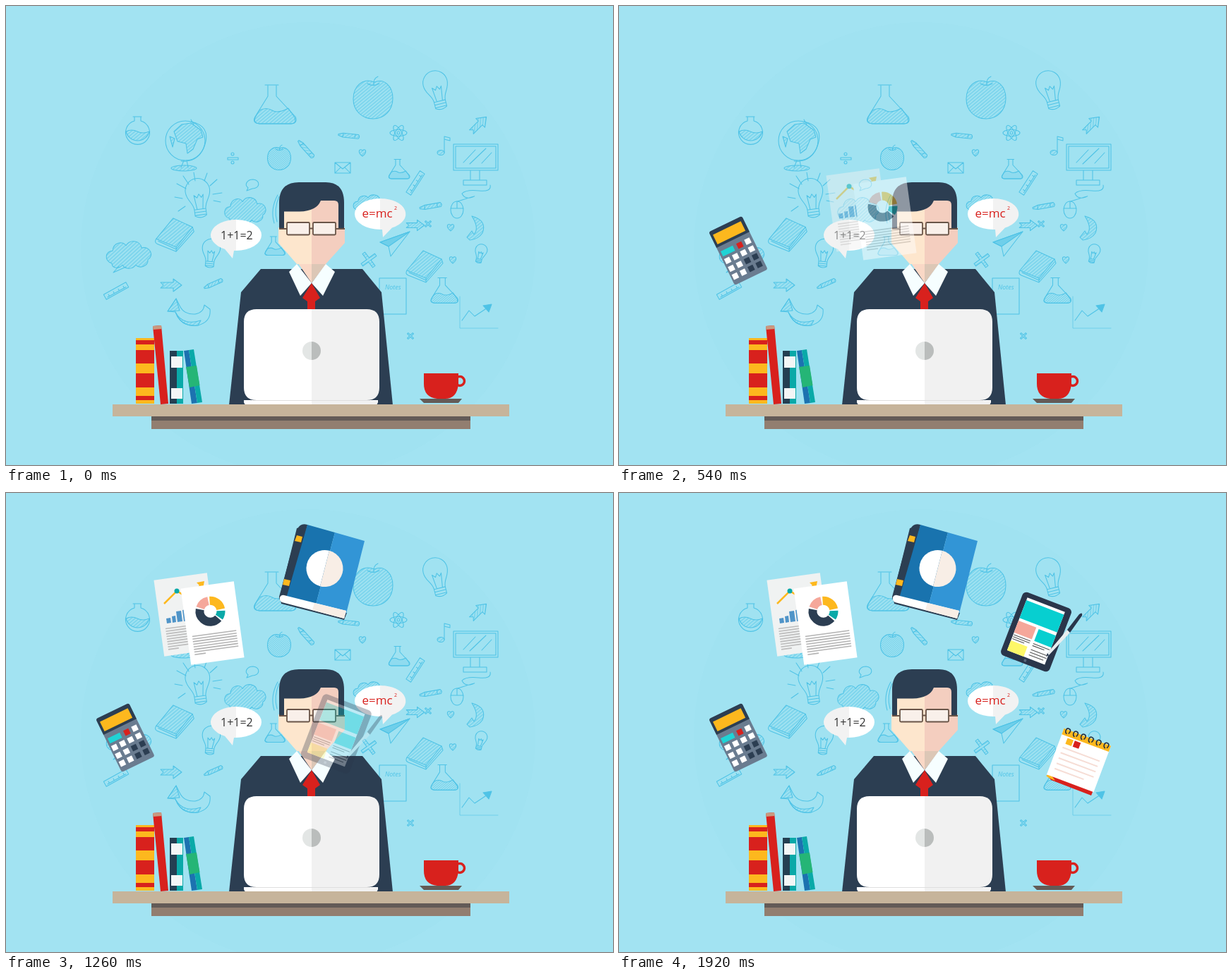
An HTML page for the animation above (2.42 s loop, 860 by 651 pixels).

```html
<!DOCTYPE html>
<html lang="en">
<head>
<meta charset="utf-8">
<title>Busy desk</title>
<style>
html, body { margin: 0; height: 100%; overflow: hidden; background: #a2e3f2; }
svg { display: block; width: 100vw; height: 100vh; }
path { vector-effect: non-scaling-stroke; }
text { font-family: "Open Sans", "Noto Sans", sans-serif; }
#doodles { fill: none; stroke: #4fc3e6; stroke-width: 1.05; stroke-linejoin: round; stroke-linecap: round; }
.hatch { fill: url(#hatch); }
.solid { fill: #4fc3e6; }
</style>
</head>
<body>
<svg viewBox="0 0 860 651">
<defs>
  <pattern id="hatch" width="3.6" height="3.6" patternUnits="userSpaceOnUse" patternTransform="rotate(-40)">
    <path d="M0 1.8H3.6" stroke="#5ac8e8" stroke-width=".9"/>
  </pattern>
  <g id="flask">
    <path d="M-14-27H5M-10-26V-11L-28 18Q-33 27-22 28H23Q33 27 29 18L2-11V-26"/>
    <path class="hatch" d="M-22 9Q-12 4-4 9T19 6L28 19Q31 28 23 28H-22Q-31 27-28 19Z"/>
  </g>
  <g id="bulb">
    <path d="M-8 14C-8 4-17 0-17-12A17 17 0 0 1 17-12C17 0 8 4 8 14ZM-8 14V23Q0 28 8 23V14M-8 18H8M-8 22H8M-4 14L-6-6L-2-2L1-7L4-2L7-6L4 14"/>
  </g>
  <path id="heart" class="hatch" d="M0 5C-8-1-4-7 0-3C4-7 8-1 0 5Z"/>
  <path id="cross" class="hatch" d="M-10-7L-7-10L0-3L7-10L10-7L3 0L10 7L7 10L0 3L-7 10L-10 7L-3 0Z"/>
  <path id="arrow" class="hatch" d="M-15-4H3V-9L15 0L3 9V4H-15L-11 0Z"/>
  <g id="book">
    <path class="hatch" d="M-25 7L-2-21L24-9L2 18Z"/>
    <path d="M-25 7Q-28 12-23 14L2 24L26-3L24-9M2 18V24M-22 10L2 21L24-5"/>
  </g>
  <g id="cloud">
    <path class="hatch" d="M-24 11C-36 8-33-6-23-5C-22-17-8-18-4-12C2-21 17-18 18-9C31-12 36 2 27 6C28 15 15 18 10 13C4 20-6 18-9 13C-15 19-24 17-24 11Z"/>
  </g>
  <g id="apple">
    <path class="hatch" d="M2-24C-15-31-28-18-28 0C-28 16-16 28 0 28C16 28 28 16 28-1C28-18 16-30 2-24Z"/>
    <path d="M-8-22Q0-17 9-22M1-20Q0-29 7-32"/>
  </g>
  <path id="pen" class="hatch" d="M-16-1L-9-3H14Q17 0 14 3H-9L-16 1ZM-9-3V3M9-3V3"/>
  <path id="ruler" d="M-18-4H18V4H-18ZM-15 2H15M-12-1V2M-4-1V2M4-1V2M12-1V2"/>
</defs>

<rect width="860" height="651" fill="#a2e3f2"/>
<circle cx="428" cy="345" r="322" fill="#a0e2f1"/>

<g id="doodles">
  <use href="#flask" transform="translate(381 139)"/>
  <use href="#flask" transform="translate(557 231) scale(.5)"/>
  <use href="#flask" transform="translate(621 403) scale(.65)"/>
  <use href="#flask" transform="translate(381 340) scale(.48)"/>
  <path d="M180 157H192M182 157V163A17 17 0 1 0 191 163V157"/>
  <path class="hatch" d="M170 178Q178 174 186 178T203 178A17 17 0 0 1 170 178Z"/>
  <circle cx="254" cy="191" r="28"/>
  <path class="hatch" d="M238 178L249 168L262 166L276 176L279 186L271 189L265 203L257 209L255 195L243 192ZM232 185L239 188L236 200Z"/>
  <path d="M262 164Q290 170 282 196T248 220M266 168L262 161M252 219L248 229M256 219L258 229"/>
  <ellipse class="hatch" cx="252" cy="230" rx="18" ry="4"/>
  <use href="#bulb" transform="translate(273 274) rotate(-8) scale(1.02)"/>
  <path d="M239 271L250 273M242 252L255 259M251 241L259 253M266 236L268 248M285 237L281 248M299 246L289 255M306 265L293 267M304 278L294 276M244 291L254 284"/>
  <use href="#bulb" transform="translate(611 121) rotate(-14) scale(1.02)"/>
  <use href="#bulb" transform="translate(290 352) rotate(6) scale(.75)"/>
  <use href="#bulb" transform="translate(672 352) rotate(14) scale(.5)"/>
  <path d="M314 215H329V218H314Z"/>
  <circle cx="321" cy="210" r="2"/><circle cx="321" cy="222" r="2"/>
  <path d="M343 258C337 253 342 246 350 246C361 247 360 259 349 259L341 262Z"/>
  <use href="#cloud" transform="translate(339 290) scale(.92 1.05)"/>
  <use href="#cloud" transform="translate(174 353) scale(1 1.1)"/>
  <path d="M160 369L152 378L170 370"/>
  <use href="#cloud" transform="translate(516 281) scale(.75 .75)"/>
  <path d="M385 268Q374 288 380 308M387 270Q379 288 384 306"/>
  <use href="#apple" transform="translate(520 132)"/>
  <use href="#apple" transform="translate(387 216) scale(.59)"/>
  <use href="#pen" transform="translate(425 203) rotate(48)"/>
  <use href="#pen" transform="translate(486 184) rotate(6) scale(.95)"/>
  <use href="#pen" transform="translate(602 284) rotate(-10)"/>
  <use href="#pen" transform="translate(294 394) rotate(-24) scale(.9)"/>
  <g transform="translate(556 180)">
    <ellipse rx="12" ry="4.5"/><ellipse rx="12" ry="4.5" transform="rotate(60)"/><ellipse rx="12" ry="4.5" transform="rotate(120)"/><circle r="2"/>
  </g>
  <use href="#heart" transform="translate(505 208)"/>
  <use href="#heart" transform="translate(630 314)"/>
  <use href="#heart" transform="translate(633 360)"/>
  <path d="M466 222H488V237H466ZM466 222L477 231L488 222M466 237L474 229M488 237L480 229"/>
  <path d="M621 208V185L629 187V191L621 189"/>
  <ellipse class="hatch" cx="616" cy="208" rx="5" ry="3.5"/>
  <path d="M634 196H697V233H634ZM637 199H694V230H637ZM658 233V247M671 233V247M648 247H681V254H648ZM648 222L665 204M657 224L680 202M674 223L688 208"/>
  <path d="M686 254Q688 264 670 262T646 266Q650 275 661 271T640 277"/>
  <ellipse cx="639" cy="289" rx="9" ry="12"/><path d="M630 287H648M639 277V287"/>
  <use href="#arrow" transform="translate(670 168) rotate(-45)"/>
  <use href="#arrow" transform="translate(580 311) scale(.85)"/>
  <use href="#arrow" transform="translate(234 396)"/>
  <use href="#ruler" transform="translate(580 251) rotate(-57)"/>
  <use href="#ruler" transform="translate(156 404) rotate(-29)"/>
  <use href="#cross" transform="translate(598 309) scale(.45)"/>
  <use href="#cross" transform="translate(514 360) rotate(8)"/>
  <use href="#cross" transform="translate(573 468) scale(.45)"/>
  <path class="hatch" d="M660 298Q682 304 675 322Q669 331 657 332L653 328L660 319L663 324Q671 315 660 298Z"/>
  <use href="#book" transform="translate(593 368)"/>
  <use href="#book" transform="translate(239 323) scale(1.05)"/>
  <path d="M529 386H567V437H529Z"/>
  <path d="M530 335L572 320L545 355L542 341Z"/><path class="solid" d="M530 335L572 320L542 341Z" fill-opacity=".6"/>
  <path d="M643 412V457H697" stroke-width=".6"/><path d="M646 446L656 432L664 440L682 428"/>
  <path class="solid" d="M676 425L688 423L684 434Z"/>
  <path d="M229 433L241 415L246 425Q252 438 268 437Q280 435 281 424L289 430Q291 448 272 453Q248 456 240 434Z"/>
  <path class="hatch" d="M229 433L241 415L246 432ZM240 434Q250 454 276 446L272 453Q248 456 240 434Z"/>
  <text x="537" y="402" font-size="9" font-style="italic" fill="#4fc3e6" stroke="none">Notes</text>
</g>

<g id="bubbles">
  <path d="M326 303A36 22 0 0 0 310 344.700L321 358L323 347H326Z" fill="#f2f2f2"/>
  <path d="M326 303A36 22 0 0 1 326 347Z" fill="#fff"/>
  <text x="304" y="330.500" font-size="16" fill="#333">1+1=2</text>
  <path d="M530 273A36 22 0 0 0 530 317Z" fill="#fff"/>
  <path d="M530 273A36 22 0 0 1 547 314.500L534 328L533 317H530Z" fill="#f2f2f2"/>
  <g fill="#d8211d"><text x="504.500" y="300" font-size="17">e=mc</text><text x="550" y="289" font-size="7">2</text></g>
</g>

<g id="person">
  <path d="M361 373H505L532 406L548 566H316L333 406Z" fill="#2c3e52"/>
  <path d="M412 362H433V393Z" fill="#fad8c6"/><path d="M433 362H453V367L433 393Z" fill="#dcc7b6"/>
  <path d="M386 314V336L412 366L433 366V270H394V314Z" fill="#fde6cd"/>
  <path d="M480 314V336L453 366H433V270H473V314Z" fill="#f4cebf"/>
  <path d="M387 315V279Q387 250 415 250H453Q479 250 479 279V315H471V282Q471 276 465 276H446Q440 291 416 291.500H394V315Z" fill="#2c3e52"/>
  <path d="M412 366L401 377L417 411L433 393ZM453 366L466 377L449 411L433 393Z" fill="#f6feff"/>
  <path d="M433 393L445 414L438 419V431H427V419L420 414Z" fill="#d8211d"/>
  <g fill="#f9f0ea" stroke="#695548" stroke-width="1.800">
    <rect x="398" y="307" width="32" height="17.500" rx="1.500"/><rect x="435" y="307" width="32" height="17.500" rx="1.500"/>
    <path d="M430 315.500H435M387 316H398M467 316H480"/>
  </g>
</g>

<g id="laptop">
  <path d="M433 430H355Q337 430 337 448V541Q337 559 355 559H433Z" fill="#fff"/>
  <path d="M433 430H511Q529 430 529 448V541Q529 559 511 559H433Z" fill="#f1f1f1"/>
  <path d="M337 559H527V562Q526 566 522 566H342Q338 566 337 562Z" fill="#fff"/>
  <path d="M433 560H526V562Q526 566 522 566H433Z" fill="#f1f1f1"/>
  <path d="M350 559.500H516" stroke="#dedede"/>
  <path d="M433 476A13 13 0 0 0 433 502Z" fill="#e3e6e5"/><path d="M433 476A13 13 0 0 1 433 502Z" fill="#babdbc"/>
</g>

<g id="desk">
  <path d="M151 565H713V582H151Z" fill="#c6b49b"/>
  <path d="M206 582H658V588H206Z" fill="#635b57"/><path d="M206 588H658V600H206Z" fill="#927e70"/>
  <path d="M184 471H210V564H184Z" fill="#fdb81e"/>
  <path d="M184 474H210V480H184ZM184 488H210V507H184ZM184 521H210V541H184ZM184 553H210V559H184Z" fill="#d8211d"/>
  <path d="M208 454L220 453L230 564L219 565Z" fill="#d8211d"/><path d="M208 454L220 453L220.500 458L208.500 459Z" fill="#c99a80"/>
  <path d="M232 489H242V564H232Z" fill="#243f52"/><path d="M242 489H251V564H242Z" fill="#0aa9a8"/>
  <path d="M234 497H250V513H234ZM234 542H250V557H234Z" fill="#f3f6f6"/>
  <path d="M252 489L259 488L271 563L263 564Z" fill="#1c72b0"/><path d="M259 488L266 487L278 562L271 563Z" fill="#0aa9a8"/>
  <path d="M255 512L270 510L274.500 538L260 541Z" fill="#25b576"/>
  <path d="M586 557H646L641 563H592Z" fill="#635b57"/>
  <circle cx="643" cy="532" r="6.500" fill="none" stroke="#d8211d" stroke-width="3.500"/>
  <path d="M592 521H641V536Q639 557 622 557H611Q592 555 592 536Z" fill="#d8211d"/>
</g>

<g id="calculator"><g id="keys" transform="translate(169 347) rotate(-26)">
  <rect x="-26" y="-42" width="52" height="84" rx="3" fill="#6a7c90"/>
  <path d="M-26-17V-39Q-26-42-23-42H23Q26-42 26-39V-17Z" fill="#2c3e52"/>
  <rect x="-22.500" y="-36" width="44" height="15" fill="#fdb81e"/>
  <rect x="-23" y="-10" width="19" height="8" fill="#1fd3d5"/>
</g></g>

<g id="reports">
  <g transform="translate(254.500 172.500) rotate(-7.800)">
    <rect x="-38" y="-54.500" width="76" height="109" fill="#f0f2f2"/>
    <g class="lines" data-x="-31" data-y="16" data-n="9" data-w="60" stroke="#bcbcbc"></g>
  </g>
  <path d="M224 157L242 139L260 150L277 129" fill="none" stroke="#fdb81e" stroke-width="2.500"/>
  <path d="M270 127L281 125L279 136Z" fill="#fdb81e"/><circle cx="242" cy="139" r="3.500" fill="#0aa9a8"/>
  <path d="M227 178L233 177L234 184L228 185ZM235 175L240 174L241 183L236 184ZM241 168L248 167L250 182L243 183ZM250 166L256 165L258 181L252 182Z" fill="#4f94c8"/>
  <g transform="translate(292.500 184.500) rotate(-7.800)">
    <rect x="-38" y="-54.500" width="76" height="109" fill="#fff"/>
    <g id="donut" transform="translate(-.7 -17)" fill="none" stroke-width="12"></g>
    <g class="lines" data-x="-31" data-y="15" data-n="8" data-w="63" stroke="#b3b3b3"></g>
  </g>
</g>

<g id="textbook">
  <path d="M427 45L412 50L388 147L390 157L479 180L483 170L400 146Z" fill="#2c3e52"/>
  <path d="M427 45Q417 42 413 51L387 147Q387 153 391 154L404 146Z" fill="#2c3e52"/>
  <path d="M427 45L466 56L438 162L397 149Z" fill="#1973ae"/><path d="M466 56L508 68L482 171L438 162Z" fill="#3295d6"/>
  <path d="M394 145L482 167L479 178L391 155Q387 153 388 148Q390 144 394 145Z" fill="#fff"/>
  <path d="M437 156L482 167L479 178L434 166Z" fill="#f8eee6"/>
  <path d="M412 60L420 62L418 70L409 68ZM394 122L403 124L401 132L392 130Z" fill="#fdb81e"/>
  <g transform="translate(451.500 107) rotate(14.500)"><path d="M0-26A26 26 0 0 0 0 26Z" fill="#fff"/><path d="M0-26A26 26 0 0 1 0 26Z" fill="#f8eee6"/></g>
</g>

<g id="tablet">
  <g transform="translate(591 197) rotate(21)">
    <rect x="-37" y="-48" width="74" height="96" rx="6" fill="#2a364b"/>
    <rect x="-29" y="-41" width="57" height="80" fill="#fff"/>
    <path d="M-29-37H28V-10H-29ZM2-5H28V13H2Z" fill="#07cfd0"/>
    <path d="M-29-6H-2V12H-29Z" fill="#f5a79a"/><path d="M-29 24H-4V39H-29Z" fill="#fdf768"/>
    <path d="M-28 15H-3M-28 18H-3M-28 21H-10M2 17H27M2 20H20M2 26H27M2 30H27M2 34H24" stroke="#555" stroke-width="1.100"/>
    <circle cy="43.500" r="2" fill="#59677b"/>
  </g>
  <path d="M635 194L639 198L609 230L605 232L607 227Z" fill="#e9eef0"/>
  <path d="M635 194L652 172Q657 168 656 174L639 198Z" fill="#2a364b"/><path d="M609 230L605 232L607 227Z" fill="#2a364b"/>
</g>

<g id="notepad">
  <path d="M606 400L612 407L669 429L676 412Z" fill="#d8211d"/>
  <path d="M605 401L611 398L618 408L609 404Z" fill="#fdb81e"/>
  <g id="pad" transform="translate(651.500 379) rotate(20.500)">
    <rect x="-35.500" y="-35" width="71" height="70" fill="#fff"/><rect x="-35.500" y="-35" width="71" height="9" fill="#fdb81e"/>
    <rect x="-26" y="-24" width="9" height="9" fill="#fdb81e"/><rect x="-15" y="-24" width="9" height="9" fill="#d8211d"/>
    <path d="M-28-9H28M-28-1H28M-28 7H28M-28 15H28M-28 23H16" stroke="#f6ddd5" stroke-width="2"/>
  </g>
</g>
</svg>
<script>
const LOOP = 2420, STEP = 30, LAST = 64;
const $ = id => document.getElementById(id);

function add(parent, tag, attrs) {
  const el = document.createElementNS("http://www.w3.org/2000/svg", tag);
  for (const name in attrs) el.setAttribute(name, attrs[name]);
  parent.append(el);
}

// Calculator keys
const key = (x, y, fill) => add($("keys"), "rect", { x: x - 4, y: y - 4, width: 8, height: 8, fill });
key(5.5, -6, "#d8211d");
key(18, -6, "#fff");
for (let row = 0; row < 3; row++)
  for (let col = 0; col < 4; col++)
    key(-19.5 + 12.5 * col, 6 + 12.3 * row, row && col > 1 ? "#2c3e52" : "#fff");

// Report text and donut chart
for (const g of document.querySelectorAll(".lines")) {
  const { x, y, n, w } = g.dataset;
  for (let i = 0; i < n; i++)
    add(g, "path", { d: `M${x} ${+y + i * 3.7}h${i == n - 1 ? w / 4 : w}`, "stroke-width": 1.6 });
}
const slice = (from, to, stroke) => add($("donut"), "circle", {
  r: 15, pathLength: 360, stroke, "stroke-dasharray": `${to - from} 360`, transform: `rotate(${from - 90})`
});
slice(4, 86, "#fdb81e");
slice(95, 132, "#0aa9a8");
slice(139, 288, "#2c3e52");
slice(296, 356, "#f5a79a");

// Notepad rings
for (let i = 0; i < 6; i++)
  add($("pad"), "path", {
    d: `M${-29 + i * 11.6} -29c-4 -1 -4 -8 0 -8s4 4 2 7`, fill: "none", stroke: "#26313f", "stroke-width": 1.6
  });

// Each item flies in from an offset while fading in, one after another
const items = [
  { el: $("calculator"), start: 0, steps: 12, dx: 256, dy: 96 },
  { el: $("reports"), start: 12, steps: 13, dx: 156, dy: 217 },
  { el: $("textbook"), start: 25, steps: 13, dx: -16, dy: 318 },
  { el: $("tablet"), start: 38, steps: 13, dx: -178, dy: 209 },
  { el: $("notepad"), start: 51, steps: 13, dx: -247, dy: 64.5 }
];

function render(time) {
  const step = Math.min(LAST, Math.floor((time % LOOP) / STEP + 0.001));
  for (const { el, start, steps, dx, dy } of items) {
    const p = Math.max(0, Math.min(1, (step - start) / steps));
    el.setAttribute("opacity", p);
    el.setAttribute("transform", `translate(${dx * (1 - p)} ${dy * (1 - p)})`);
  }
}

let origin;
function tick(now) {
  origin ??= now;
  render(now - origin);
  requestAnimationFrame(tick);
}
render(0);
requestAnimationFrame(tick);
</script>
</body>
</html>
```
